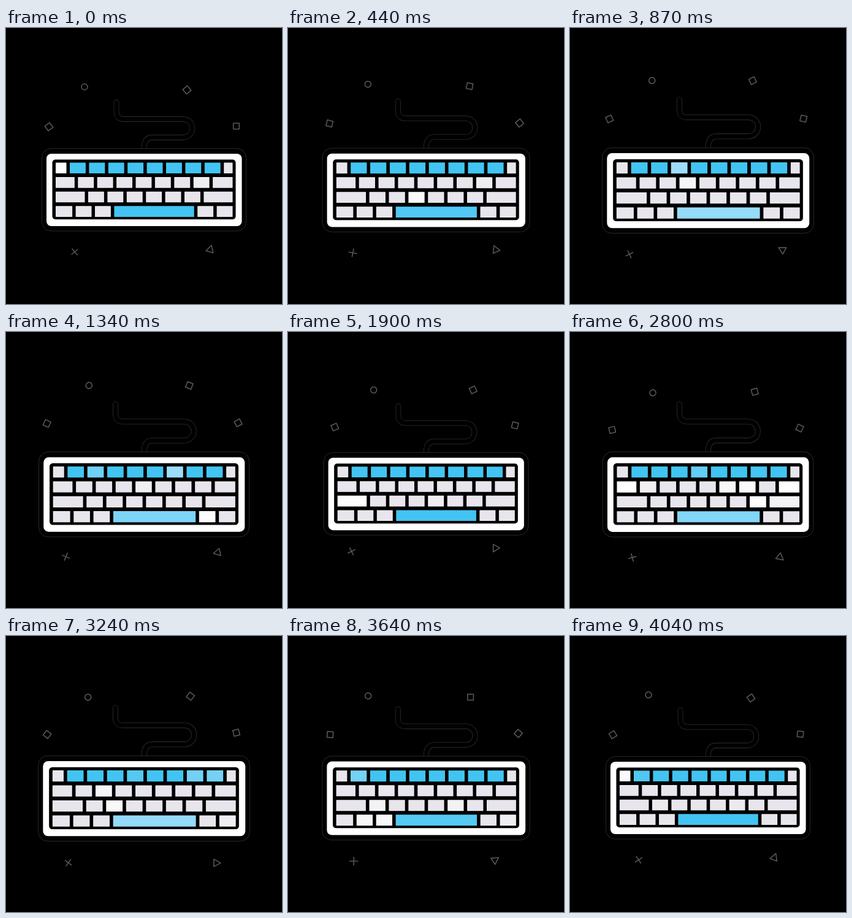
These frames come from a looping animation (450x450 px, 4110 ms). An HTML page:

```html
<!DOCTYPE html>
<html lang="en">
<head>
<meta charset="utf-8">
<title>Keyboard</title>
<style>
html, body { margin: 0; width: 100%; height: 100%; overflow: hidden; background: #000; }
svg { display: block; width: 100%; height: 100%; }
</style>
</head>
<body>
<svg id="stage" viewBox="0 0 450 450"></svg>
<script>
const LOOP = 4110;
const QUARTER = LOOP / 4;
const stage = document.getElementById('stage');

function add(parent, tag, attrs = {}) {
  const el = document.createElementNS('http://www.w3.org/2000/svg', tag);
  for (const name in attrs) el.setAttribute(name, attrs[name]);
  return parent.appendChild(el);
}

function box(parent, x, y, right, bottom, rx, fill, extra = {}) {
  return add(parent, 'rect', { x, y, width: right - x, height: bottom - y, rx, fill, ...extra });
}

const mix = (a, b, k) => a + (b - a) * k;
const blend = (a, b, k) => `rgb(${a.map((v, i) => Math.round(mix(v, b[i], k)))})`;
const ease = k => (1 - Math.cos(Math.PI * k)) / 2;

let seed = 7;
function random() {
  seed = (seed * 16807) % 2147483647;
  return seed / 2147483647;
}

// Keyboard and cable
const EDGE = '#2e2e32';
const board = add(stage, 'g');
const cable = 'M180 121V136Q180 148.5 192 148.5H288C309 148.5 309 178.5 288 178.5H238Q225 178.5 225 198';
for (const [stroke, width] of [[EDGE, 8.8], ['#000', 7.2]]) {
  add(board, 'path', {
    d: cable, fill: 'none', stroke, 'stroke-width': width, 'stroke-linecap': 'round'
  });
}
box(board, 58.5, 196.5, 391.5, 331, 15, '#000', { stroke: EDGE, 'stroke-width': 0.9 });
box(board, 66, 205, 384.5, 323, 8, '#fff');
box(board, 75.5, 214.5, 374.5, 312, 5, '#000');

const LEFT = 81, RIGHT = 369.5, GAP = 5.5, PITCH = 31.4;
const GREY = [232, 230, 236], WHITE = [255, 255, 255];
const BLUE = [66, 196, 242], SKY = [160, 222, 250];

const run = (first, count) => Array.from({ length: count }, (_, i) => first + i * PITCH);
const rowAfter = (lead, count) => [LEFT, ...run(LEFT + lead, count)];
const rows = [
  rowAfter(23, 9),
  rowAfter(36.3, 8),
  rowAfter(53, 7),
  [...rowAfter(32.6, 3), ...run(RIGHT + GAP - 2 * PITCH, 2)]
];

const keys = rows.flatMap((starts, r) => starts.map((x, c) => {
  const space = r === 3 && c === 3;
  const blue = space || (r === 0 && c > 0 && c < 9);
  const right = (starts[c + 1] ?? RIGHT + GAP) - GAP;
  const y = 219.5 + r * 23.6;
  return {
    el: box(board, x, y, right, y + 17.6, 0.5, '#000'),
    base: blue ? BLUE : GREY,
    lit: blue ? SKY : WHITE,
    space,
    flashAt: random() * LOOP
  };
}));

function flash(at, t) {
  const gap = Math.abs(t - at);
  return Math.max(0, 1 - Math.min(gap, LOOP - gap) / 300);
}

// Drifting shapes: a home point and three offsets, one per quarter of the loop
const square = 'M-4.8 -4.8H4.8V4.8H-4.8Z';
const floaters = [
  ['M-5 0A5 5 0 1 1 5 0A5 5 0 1 1 -5 0Z', 0, [128, 96], [6, -11], [12, -1], [6, 4]],
  [square, 50, [295, 101], [3, -16], [7, -6], [6, -3]],
  [square, 53, [70, 161], [-6, -13.5], [7, -5.5], [-3, -0.5]],
  [square, 0, [375.5, 160], [5.5, -13], [-6, -7.5], [0, -2.5]],
  ['M-7 0H7M0 -7V7', 50, [112, 365], [-16, 4], [-8, -8], [-11, 5]],
  ['M7 0L-4 6L-4 -6Z', -75, [333, 361], [14, 0.5], [4.5, -9], [10.5, 9.5]]
].map(([d, turn, home, ...offsets]) => ({
  turn, home,
  stops: [[0, 0], ...offsets],
  el: add(stage, 'path', {
    d, fill: 'none', stroke: '#56565c', 'stroke-width': 1.6, 'stroke-linejoin': 'round'
  })
}));

function draw(t) {
  const pulse = ease(t / QUARTER);
  board.setAttribute('transform',
    `translate(225 230) scale(${1 + 0.038 * pulse}) translate(-225 -230)`);

  for (const { el, base, lit, space, flashAt } of keys) {
    el.setAttribute('fill', blend(base, lit, space ? pulse ** 2 : flash(flashAt, t)));
  }

  const leg = Math.floor(t / QUARTER) % 4;
  const k = ease(t / QUARTER - leg);
  for (const { el, home, stops, turn } of floaters) {
    const [x, y] = home.map((v, i) => v + mix(stops[leg][i], stops[(leg + 1) % 4][i], k));
    el.setAttribute('transform', `translate(${x} ${y}) rotate(${turn - 360 * t / LOOP})`);
  }
}

const start = performance.now();
function tick() {
  draw((performance.now() - start) % LOOP);
  requestAnimationFrame(tick);
}
tick();
</script>
</body>
</html>
```
